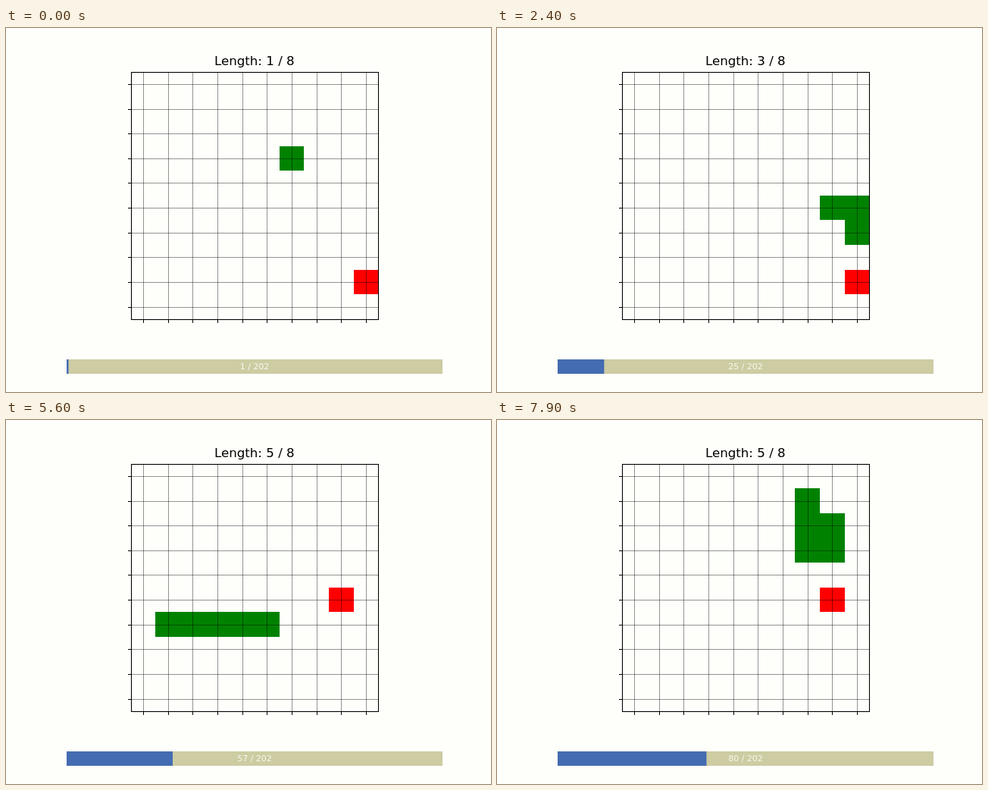
These frames come from a looping animation (640x480 px, 8000 ms). An HTML page with a canvas:

```html
<!DOCTYPE html>
<html>
<head>
<meta charset="utf-8">
<title>Snake</title>
<style>
html, body { margin: 0; width: 100%; height: 100%; overflow: hidden; background: #fefefb; }
canvas { display: block; }
</style>
</head>
<body>
<canvas id="stage" width="640" height="480"></canvas>
<script>
const ctx = document.getElementById('stage').getContext('2d');
const SIZE = 10, CELL = 32.64, LEFT = 164.8, TOP = 57.6;
const STEPS = 80, TOTAL = 202, STEP_MS = 100;

// Head path on a wrapping board: direction and number of cells per run
const RUNS = 'D2 L9 U2 R1 U8 R1 D3 L1 U2 L3 D3 R2 U1 L3 U2 R2 D1 R2 U1 L9 U2 L2 U4 R4 D1 L4 D2 R1 U1';
const DIRS = { U: [0, -1], D: [0, 1], L: [-1, 0], R: [1, 0] };
const path = [[6, 3]];
for (const run of RUNS.split(' ')) {
  const [dx, dy] = DIRS[run[0]];
  for (let i = 0; i < +run.slice(1); i++) {
    const [x, y] = path[path.length - 1];
    path.push([(x + dx + SIZE) % SIZE, (y + dy + SIZE) % SIZE]);
  }
}

// Each fruit lasts until the head reaches it at the given step
const FRUITS = [
  { until: 27, cell: [9, 8] },
  { until: 42, cell: [4, 8] },
  { until: Infinity, cell: [8, 5] }
];

const px = v => Math.round(LEFT + CELL * v);
const py = v => Math.round(TOP + CELL * v);

function rect(color, x, y, w, h) {
  ctx.fillStyle = color;
  ctx.fillRect(x, y, w, h);
}

function cell([x, y], color) {
  rect(color, px(x), py(y), px(x + 1) - px(x), py(y + 1) - py(y));
}

function label(text, x, y, size, color) {
  ctx.font = size + 'px "DejaVu Sans", sans-serif';
  ctx.textAlign = 'center';
  ctx.fillStyle = color;
  ctx.fillText(text, x, y);
}

function drawAxes() {
  const x0 = px(0), x1 = px(SIZE), y0 = py(0), y1 = py(SIZE);
  for (let i = 0; i < SIZE; i++) {
    const x = px(i + 0.5), y = py(i + 0.5);
    rect('rgba(0,0,0,0.42)', x, y0, 1, y1 - y0);
    rect('rgba(0,0,0,0.42)', x0, y, x1 - x0, 1);
    rect('#000', x, y1, 1, 5);
    rect('#000', x0 - 4, y, 5, 1);
  }
  ctx.strokeStyle = '#000';
  ctx.lineWidth = 1.1;
  ctx.strokeRect(x0 + 0.5, y0 + 0.5, x1 - x0, y1 - y0);
}

function draw(step) {
  const eaten = FRUITS.findIndex(f => step < f.until);
  const length = Math.min(step, 3 + eaten);

  rect('#fefefb', 0, 0, 640, 480);
  cell(FRUITS[eaten].cell, '#ff0000');
  for (const c of path.slice(step - length, step)) cell(c, '#008200');
  drawAxes();
  label(`Length: ${length} / 8`, 327.8, 49, 16.67, '#000');

  rect('#cdcca2', 80, 437, 496, 19);
  rect('#446cb0', 80, 437, 496 * step / TOTAL, 19);
  label(`${step} / ${TOTAL}`, 328, 450, 11, '#f8f8f0');
}

const start = performance.now();
function tick() {
  const t = Math.max(0, performance.now() - start);
  draw(Math.floor(t / STEP_MS) % STEPS + 1);
  requestAnimationFrame(tick);
}
tick();
</script>
</body>
</html>
```
